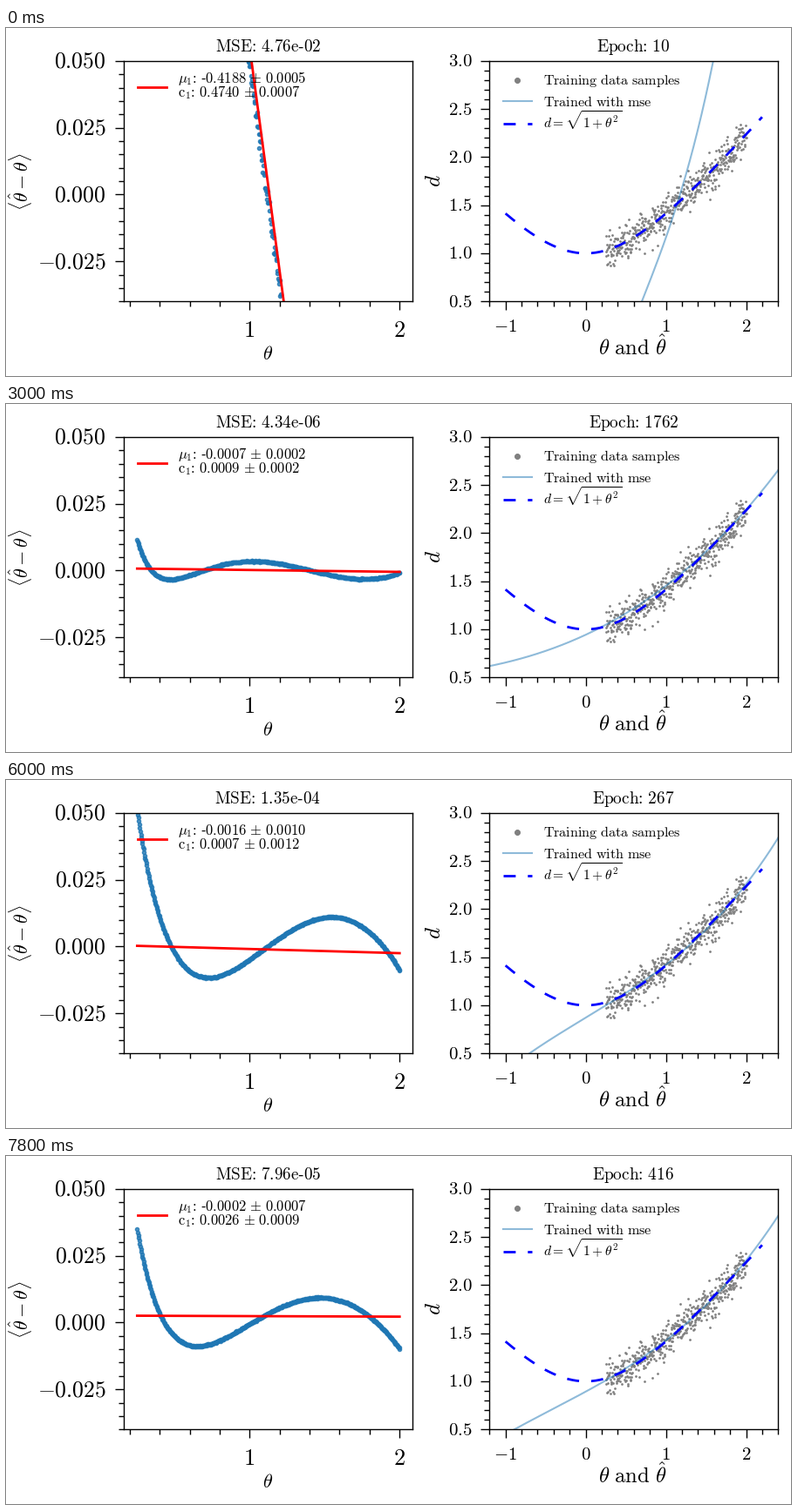
Write a matplotlib script that moves like this. It is 900 px wide and 400 px high and loops after 8000 ms.

```python
import numpy as np
import matplotlib.pyplot as plt
from matplotlib.animation import FuncAnimation
from matplotlib.lines import Line2D
from matplotlib.ticker import MultipleLocator

W, H = 900, 400
STEP_MS, HOLD, FRAMES = 100, 3, 80

plt.rcParams["mathtext.fontset"] = "cm"

# Dense early epochs, sparse later ones, shown in alphabetical order.
EPOCHS = sorted([*range(10, 20), *range(21, 27), 29, 35, 40, 116, 148, 187,
                 267, 328, 364, 416, 1762], key=str)

# Printed fit results: epoch -> log loss, slope, its error, offset, its error
FIT = {
    10: (np.log(4.76e-2), -.4188, .0005, .4740, .0007),
    19: (np.log(2.34e-2), -.2795, .0010, .3108, .0013),
    24: (np.log(1.19e-2), -.1857, .0014, .2121, .0017),
    148: (np.log(2.20e-4), -.0022, .0013, .0062, .0016),
    328: (np.log(1.10e-4), -.0013, .0009, -.0017, .0011),
    416: (np.log(7.96e-5), -.0002, .0007, .0026, .0009),
    1762: (np.log(4.34e-6), -.0007, .0002, .0009, .0002),
}

# A quartic in sqrt(theta) goes through the residuals at these thetas.
THETA_KEYS = np.array([.25, .5, .8, 1.5, 2])
RESIDUAL = {
    10: -.409 * (THETA_KEYS - 1.1165),
    24: .196 - .381 * (THETA_KEYS - .25) + .101 * (THETA_KEYS - .25) ** 2 + .02 * (THETA_KEYS - .25),
    148: (.067, .0005, -.0153, .0125, -.0078),
    416: (.035, -.0052, -.0068, .0092, -.0098),
    1762: (.0115, -.0032, .0019, -.0012, -.0008),
}
# Same quadratic shape as the fit at that epoch, written around theta = 1.
RESIDUAL[24] = .0054 - .181 * (THETA_KEYS - 1) + .101 * (THETA_KEYS - 1) ** 2

# A cubic d(theta) goes through the network outputs at these d.
D_KEYS = np.array([.5, 1, 2, 3])
RESPONSE = {
    10: (.70, .93, 1.31, 1.59),
    24: (.115, .55, 1.50, 2.21),
    148: (-.51, .28, 1.745, 2.56),
    416: (-.89, .23, 1.74, 2.61),
    1762: (-2.4, .14, 1.732, 2.7),
}


def at_epoch(table, epoch):
    """Interpolate every column of a table over sqrt(epoch)."""
    keys = np.sqrt(list(table))
    return np.array([np.interp(np.sqrt(epoch), keys, col)
                     for col in zip(*table.values())])


def through(xs, ys, x):
    """Polynomial through all given points, evaluated at x."""
    return np.polyval(np.polyfit(xs, ys, len(xs) - 1), x)


def roman(s):
    """Upright math text with real hyphens."""
    return r"\ ".join(r"\text{%s}" % w.replace("-", "\u2010") for w in s.split())


def label(x, y, s, size, ha="center", **kw):
    kw.setdefault("va", "baseline")
    return fig.text(x / W, 1 - y / H, f"${s}$", fontsize=size, ha=ha, **kw)


def legend_line(x0, x1, y, **kw):
    fig.add_artist(Line2D([x0 / W, x1 / W], [1 - y / H] * 2,
                          transform=fig.transFigure, **kw))


def panel(left, xlim, ylim, xstep, ystep):
    ax = fig.add_axes([left / W, 1 - 314.3 / H, 331 / W, 276.5 / H],
                      xlim=xlim, ylim=ylim)
    for axis, (major, minor) in ((ax.xaxis, xstep), (ax.yaxis, ystep)):
        axis.set_major_locator(MultipleLocator(major))
        axis.set_minor_locator(MultipleLocator(minor))
    ax.tick_params(which="major", length=7, width=1, labelbottom=False, labelleft=False)
    ax.tick_params(which="minor", length=4, width=1)
    for spine in ax.spines.values():
        spine.set_linewidth(1)
    return ax


fig = plt.figure(figsize=(W / 100, H / 100), dpi=100, facecolor="white")
rng = np.random.default_rng(4)
theta = np.linspace(.25, 2, 500)

# Left panel: residuals and linear fit
ax1 = panel(135.3, (.1625, 2.0875), (-.04, .05), (1, .2), (.025, .005))
dots, = ax1.plot([], [], "o", color="tab:blue", ms=3, alpha=.8)
fit, = ax1.plot([], [], color="red", lw=2)
for k in range(4):
    label(115, 46 + 76.9 * k, f"{.05 - .025 * k:.3f}", 18.5, "right")
for k in (1, 2):
    label(106.7 + 172 * k, 355, str(k), 19)
label(300.5, 381, r"\theta", 16)
label(17.5, 176.5, r"\langle\hat{\theta}-\theta\rangle", 16,
      rotation=90, va="center")
legend_line(151.3, 183.7, 68, color="red", lw=2)
slope_text = label(197, 63.3, "x", 11.9, "left")
offset_text = label(197, 78.7, "x", 11.9, "left")
loss_text = label(300.3, 27, "x", 13.8)

# Right panel: samples, network response and true relation
ax2 = panel(554.3, (-1.2, 2.4), (.5, 3), (1, .2), (.5, .1))
truth = lambda t: np.sqrt(1 + t * t)
true_theta = np.linspace(-1, 2.2, 200)
dashed = dict(color="blue", lw=2, linestyle=(0, (5, 5)))
ax2.plot(theta, truth(theta) + rng.normal(0, .09, theta.size), "o",
         color="gray", ms=2, mew=0)
response, = ax2.plot([], [], color="tab:blue", alpha=.5, lw=1.5)
ax2.plot(true_theta, truth(true_theta), **dashed)
for k in range(6):
    label(535, 44.2 + 55.3 * k, f"{3 - k / 2:.1f}", 15, "right")
for k in range(-1, 3):
    label(664.5 + 92 * k, 349, str(k), 15)
label(718.5, 376.5, r"\theta\ \text{and}\ \hat{\theta}", 17.7)
label(490.5, 176, "d", 18, rotation=90, va="center")
legend_line(586.3, 586.3, 59.5, color="gray", marker="o", ms=4.8, mew=0)
legend_line(569.7, 602.7, 84, color="tab:blue", alpha=.5, lw=1.5)
legend_line(569.5, 603.2, 110, **dashed)
label(616, 64.5, roman("Training data samples"), 11.6, "left")
label(616, 89.5, roman("Trained with mse"), 11.6, "left")
label(616, 115.3, r"d=\sqrt{1+\theta^2}", 11.2, "left")
epoch_text = label(719.3, 27, "x", 13.9)


def fit_text(name, value, error):
    return (rf"${name}_1\text{{:}}\ {roman(f'{value:.4f}')}"
            rf"\ {{\pm}}\ {roman(f'{error:.4f}')}$")


def draw(frame):
    epoch = EPOCHS[min(frame // HOLD, len(EPOCHS) - 1)]
    log_loss, slope, slope_err, offset, offset_err = at_epoch(FIT, epoch)

    # The jitter of the residuals dies out as training goes on.
    spread = .0001 + .002 * np.exp(-(epoch / 60) ** 2)
    noise = np.random.default_rng(epoch).normal(0, spread, theta.size)
    residual = through(np.sqrt(THETA_KEYS), at_epoch(RESIDUAL, epoch), np.sqrt(theta))
    dots.set_data(theta, residual + noise)
    ends = theta[[0, -1]]
    fit.set_data(ends, offset + slope * ends)

    outputs = at_epoch(RESPONSE, epoch)
    output = np.linspace(outputs[0], outputs[-1], 200)
    response.set_data(output, through(outputs, D_KEYS, output))

    slope_text.set_text(fit_text(r"\mu", slope, slope_err))
    offset_text.set_text(fit_text(r"\mathrm{c}", offset, offset_err))
    loss_text.set_text(f"${roman(f'MSE: {np.exp(log_loss):.2e}')}$")
    epoch_text.set_text(f"${roman(f'Epoch: {epoch}')}$")
    return dots, fit, response, slope_text, offset_text, loss_text, epoch_text


anim = FuncAnimation(fig, draw, frames=FRAMES, interval=STEP_MS,
                     init_func=lambda: draw(0), repeat=True, repeat_delay=0)
plt.show()
```
